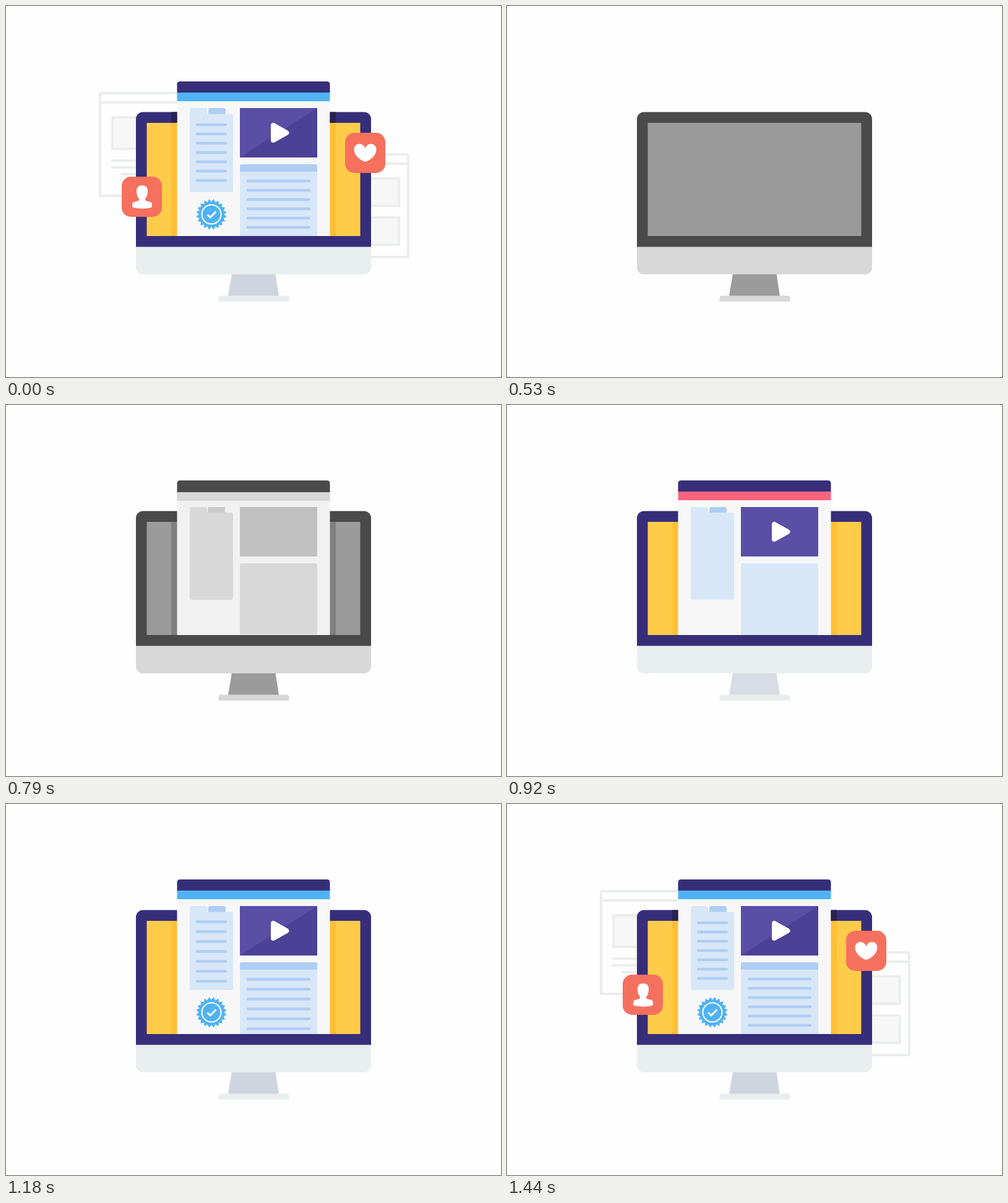
These frames come from a looping animation (800x600 px, 1.61 s). An HTML page:

```html
<!DOCTYPE html>
<html lang="en">
<head>
<meta charset="utf-8">
<title>Desktop illustration build-up</title>
<style>
  html, body { margin: 0; width: 100%; height: 100%; overflow: hidden; background: #fefefe; }
  svg { display: block; width: 100vw; height: 100vh; }

  /* Palettes */
  .color {
    --frame: #372e7a; --screen: #ffcc4a; --shade: #ffbf35; --chin: #e9eeee; --stand: #cfd5df;
    --panel: #f7f7f7; --card: #d7e7f8; --tab: #aecdf2; --video: #5a4ea6; --bar: #4fb3f3;
  }
  .draft { --bar: #ff647f; --stand: #d8dce4; }
  .mono {
    --frame: #4a4a4a; --screen: #9b9b9b; --shade: #7f7f7f; --chin: #d8d8d8; --stand: #9b9b9b;
    --panel: #f1f1f1; --card: #d8d8d8; --tab: #cbcbcb; --video: #c0c0c0; --bar: #d8d8d8;
  }
  .frame { fill: var(--frame); }
  .screen { fill: var(--screen); }
  .shade { fill: var(--shade); }
  .chin { fill: var(--chin); }
  .stand { fill: var(--stand); }
  .panel { fill: var(--panel); }
  .card { fill: var(--card); }
  .tab { fill: var(--tab); }
  .video { fill: var(--video); }
  .bar { fill: var(--bar); }
  .lines { fill: none; stroke: #aecdf2; stroke-width: 4.4; stroke-linecap: round; }
  .pages { fill: #fefefe; stroke: #ebeded; stroke-width: 4; }
  .pages .pic { fill: #f7f7f7; }
  .app { fill: #f6705e; }
  .white { fill: #fff; }

  /* Each layer is switched on and off in hard steps */
  .layer { animation: 1610ms step-end infinite; }
  #mono-screen { animation-name: mono-screen; }
  #mono-window { animation-name: mono-window; }
  #mono-cards { animation-name: mono-cards; }
  #draft { animation-name: draft; }
  #final { animation-name: final; }
  #loose { animation-name: loose; }
  #tight, #apps { animation-name: apps; }
  #pages, #shadows { animation-name: pages; }

  @keyframes mono-screen { 0% { visibility: hidden } 32.919% { visibility: visible } 57.143% { visibility: hidden } }
  @keyframes mono-window { 0% { visibility: hidden } 40.994% { visibility: visible } 57.143% { visibility: hidden } }
  @keyframes mono-cards { 0% { visibility: hidden } 49.068% { visibility: visible } 57.143% { visibility: hidden } }
  @keyframes draft { 0% { visibility: hidden } 57.143% { visibility: visible } 65.217% { visibility: hidden } }
  @keyframes final { 0% { visibility: visible } 20.497% { visibility: hidden } 65.217% { visibility: visible } }
  @keyframes loose { 0% { visibility: hidden } 73.292% { visibility: visible } 81.366% { visibility: hidden } }
  @keyframes apps { 0% { visibility: visible } 20.497% { visibility: hidden } 81.366% { visibility: visible } }
  @keyframes pages { 0% { visibility: visible } 20.497% { visibility: hidden } 89.441% { visibility: visible } }
</style>
</head>
<body>
<svg viewBox="0 0 800 600">
  <defs>
    <g id="monitor">
      <path class="stand" d="M365 433h70.500l5.500 36h-82z"/>
      <path class="chin" d="M343.500 478v-5q0-4.500 4.500-4.500h105q4.500 0 4.500 4.500v5z"/>
      <path class="chin" d="M210 389h380v33.500a11.500 11.500 0 0 1-11.500 11.500h-357a11.500 11.500 0 0 1-11.500-11.500z"/>
      <path class="frame" d="M210 389.500v-206.500a11.500 11.500 0 0 1 11.500-11.500h357a11.500 11.500 0 0 1 11.500 11.500v206.500z"/>
      <path class="screen" d="M227.500 189h345v183h-345z"/>
    </g>
    <g id="window">
      <path class="shade" d="M267 189h266v183h-266z"/>
      <path class="panel" d="M276.500 140h247v232h-247z"/>
      <path class="bar" d="M276.500 139h247v15h-247z"/>
      <path class="frame" d="M276.500 140v-13q0-5 5-5h237q5 0 5 5v13z"/>
    </g>
    <g id="tabs">
      <path class="tab" d="M327 176v-8q0-3 3-3h22q3 0 3 3v8z"/>
      <path class="card" d="M297 180v-12q0-3 3-3h22q3 0 3 3v12z"/>
    </g>
    <path id="video" class="video" d="M378 165h125v80h-125z"/>
    <path id="text-card" class="card" d="M378 372v-113q0-3 3-3h119q3 0 3 3v113z"/>
    <path id="play" d="M432 193v24l21.500-12z" fill="#fff" stroke="#fff" stroke-width="8" stroke-linejoin="round"/>
  </defs>

  <g id="pages" class="layer pages">
    <path d="M300 307H152V144q0-3 3-3H300"/>
    <path d="M152 156H300M170 250h60M170 261h60M185 272h50"/>
    <path class="pic" d="M172 180h60v51h-60z"/>
    <path d="M540 406H650V243q0-3-3-3H540"/>
    <path d="M540 255H650"/>
    <path class="pic" d="M560 279h75v44h-75zM560 342h75v44h-75z"/>
  </g>

  <g id="mono-screen" class="layer mono"><use href="#monitor"/></g>
  <g id="mono-window" class="layer mono">
    <use href="#window"/>
    <path class="bar" d="M276.500 141h247v14h-247z"/>
    <path class="frame" d="M276.500 139h247v2h-247z"/>
  </g>
  <g id="mono-cards" class="layer mono">
    <use href="#tabs" x="0"/>
    <path class="tab" d="M326 176v-8q0-3 3-3h22q3 0 3 3v8z"/>
    <path class="panel" d="M354 165h2v9h-2z"/>
    <rect class="card" x="297" y="174" width="70" height="141" rx="3"/>
    <use href="#video"/>
    <rect class="card" x="378" y="256" width="125" height="115" rx="3"/>
  </g>

  <g id="draft" class="layer color draft">
    <use href="#monitor"/>
    <use href="#window"/>
    <use href="#tabs"/>
    <rect class="card" x="297" y="174" width="70" height="141" rx="3"/>
    <use href="#video"/>
    <use href="#play"/>
    <use href="#text-card"/>
  </g>

  <g id="final" class="layer color">
    <use href="#monitor"/>
    <use href="#window"/>
    <use href="#tabs"/>
    <rect class="card" x="297" y="174.500" width="70" height="126.500" rx="3"/>
    <use href="#video"/>
    <path d="M503 165v80h-125z" fill="#4b4196"/>
    <use href="#play"/>
    <use href="#text-card"/>
    <path class="tab" d="M378 268v-9q0-3 3-3h119q3 0 3 3v9z"/>
    <polygon id="seal" class="bar"/>
    <circle cx="332" cy="337" r="15.500" fill="none" stroke="#fff" stroke-width="2"/>
    <path d="M325.500 337.500l4.500 4.500 9.500-9.500" fill="none" stroke="#fff" stroke-width="3"/>
  </g>

  <path id="shadows" class="layer" d="M267 171.500h9.500v17.500h-9.500zM523.500 171.500h9.500v17.500h-9.500z" fill="#292250"/>
  <g id="loose" class="layer lines"></g>
  <g id="tight" class="layer lines"></g>

  <g id="apps" class="layer">
    <rect class="app" x="548" y="205" width="65" height="65" rx="15"/>
    <path class="white" d="M580.500 231C581 226 586 223 590 223C595 223 598.500 227 598.500 232C598.500 241 590 249 580.500 252C571 249 562.500 241 562.500 232C562.500 227 566 223 571 223C575 223 580 226 580.500 231Z"/>
    <rect class="app" x="187" y="276" width="65" height="65" rx="15"/>
    <path class="white" d="M220 290C226 290 229 293.500 229 299C229 305 227.500 309 225 312V314C226 316 233 316 235 318C236.300 320 236 325 236 325C231 328.500 209 328.500 204 325C204 325 203.700 320 205 318C207 316 214 316 215 314V312C212.500 309 211 305 211 299C211 293.500 214 290 220 290Z"/>
  </g>
</svg>
<script>
  const $ = id => document.getElementById(id);

  const rows = (x, y, width, gap, count) =>
    Array.from({ length: count }, (_, i) => `M${x} ${y + i * gap}h${width}`).join('');

  const addText = (id, leftY, rightY, gap) => {
    const path = document.createElementNS('http://www.w3.org/2000/svg', 'path');
    path.setAttribute('d', rows(309, leftY, 46, gap, 7) + rows(391, rightY, 99, gap, 6));
    $(id).append(path);
  };
  addText('loose', 190.5, 283.5, 16);
  addText('tight', 192, 283, 15);

  // Seal with 20 teeth
  const teeth = 20;
  $('seal').setAttribute('points', Array.from({ length: teeth * 2 }, (_, i) => {
    const r = i % 2 ? 25 : 20.5;
    const a = i * Math.PI / teeth;
    return `${332 + r * Math.sin(a)},${337 - r * Math.cos(a)}`;
  }).join(' '));
</script>
</body>
</html>
```
